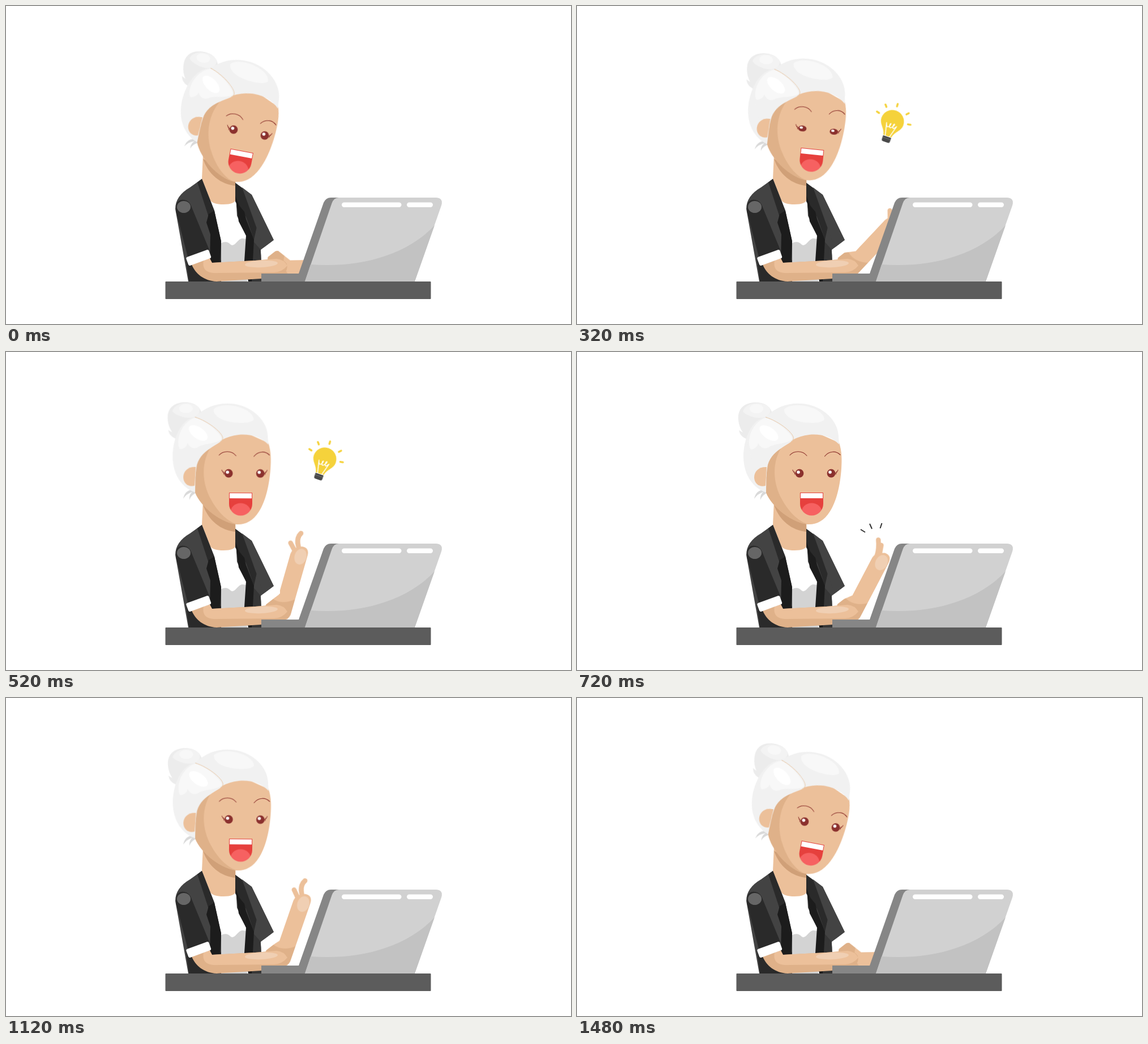
These frames come from a looping animation (998x561 px, 1.76 s). An HTML page:

```html
<!DOCTYPE html>
<html lang="en">
<head>
<meta charset="utf-8">
<title>Bright idea</title>
<style>
  html, body { margin: 0; width: 100%; height: 100%; overflow: hidden; background: #fff; }
  svg { display: block; width: 100%; height: 100%; }

  .head, .brows, .eyes, .arm, .bulb, .glow, .open, .closed, .spark {
    animation: 1760ms cubic-bezier(.4, .1, .6, .9) infinite;
  }
  .head { transform-origin: 376px 264px; animation-name: nod; }
  .brows { animation-name: raise; }
  .eyes { transform-origin: 0 214px; animation-name: blink; animation-timing-function: linear; }
  .arm { animation-name: swing; }
  .bulb { animation-name: rise; animation-timing-function: linear; }
  .glow { animation-name: glow; animation-timing-function: linear; }
  .open { animation-name: part; animation-timing-function: step-end; }
  .closed { animation-name: snap; animation-timing-function: step-end; }
  .spark { animation-name: spark; animation-timing-function: step-end; }

  @keyframes nod {
    0%, 6.82%, 84.09%, 100% { transform: rotate(10.7deg); }
    31.25%, 61.36% { transform: rotate(0deg); }
  }
  @keyframes raise {
    0%, 2.27%, 84.09%, 100% { transform: translateY(10.7px); }
    18.18%, 61.36% { transform: translateY(0); }
  }
  @keyframes blink {
    0%, 11.36%, 19.32%, 100% { transform: scaleY(1); }
    15.91% { transform: scaleY(.1); }
  }
  @keyframes swing {
    0%, 2.27%, 84.09%, 100% { transform: translate(478px, 452px) rotate(-1deg); }
    29.55%, 34.09%, 53.41%, 61.36% { transform: translate(478px, 452px) rotate(-74deg); }
    42.05% { transform: translate(478px, 452px) rotate(-61.5deg); }
  }
  @keyframes rise {
    0%, 11.36% { transform: translate(553.4px, 213px) rotate(19deg); }
    36.36%, 100% { transform: translate(566.6px, 180px) rotate(19deg); }
  }
  @keyframes glow {
    0%, 11.36% { opacity: 0; }
    15.91%, 36.3% { opacity: 1; }
    36.35%, 100% { opacity: 0; }
  }
  @keyframes part {
    0%, 45.45% { opacity: 1; }
    37.5% { opacity: 0; }
  }
  @keyframes snap {
    0%, 45.45% { opacity: 0; }
    37.5% { opacity: 1; }
  }
  @keyframes spark {
    0%, 45.45% { opacity: 0; }
    38.64% { opacity: 1; }
  }

  .skin { fill: #ecc09a; }
  .shade { fill: #dfb189; }
  .shine { fill: #f0cfb3; }
  .finger { fill: none; stroke: #ecc09a; stroke-width: 8.5; stroke-linecap: round; }
  .coal { fill: #1c1c1c; }
  .dark { fill: #2a2a2a; }
  .gray { fill: #434343; }
  .white { fill: #fff; }
  .hair { fill: #f1f1f1; }
  .gloss { fill: #f8f8f8; }
  .brow { fill: none; stroke: #8c322c; stroke-width: 1.1; stroke-linecap: round; }
  .iris { fill: #8b312e; }
  .yellow { fill: #f5d23b; }
  .ray { stroke: #f5d23b; stroke-width: 3.4; stroke-linecap: round; }
</style>
</head>
<body>
<svg viewBox="0 0 998 561">
  <defs>
    <clipPath id="mouth"><path d="M394 248H435V268A20.5 20.5 0 0 1 394 268Z"/></clipPath>
    <path id="ray" class="ray" d="M28 0H32.5"/>
  </defs>

  <!-- bulb -->
  <g class="bulb"><g class="glow">
    <path class="yellow" d="M-20.5 0A20.5 20.5 0 1 1 20.5 0C20.5 11 9 16 7.5 27H-7.5C-9 16 -20.5 11 -20.5 0Z"/>
    <path d="M-4 27L-9 5Q-7 13 -4 11T-1 4Q-3 4 -2 9T3 9T5 3Q3 4 4 9T10 6L4 27" fill="none" stroke="#fff" stroke-width="1.5" stroke-linejoin="round"/>
    <path d="M-7.5 28H7.5V35Q7.5 38 4.5 38H-4.5Q-7.5 38 -7.5 35Z" fill="#4a4a4a"/>
    <path d="M-7.5 31.5H7.5" stroke="#777" stroke-width=".8"/>
    <use href="#ray" transform="rotate(-166)"/>
    <use href="#ray" transform="rotate(-131)"/>
    <use href="#ray" transform="rotate(-92)"/>
    <use href="#ray" transform="rotate(-46)"/>
    <use href="#ray" transform="rotate(-9)"/>
  </g></g>

  <!-- far arm -->
  <path class="spark" d="M501 313L509 318M517 303L521 312M538.5 302L535.5 311" stroke="#333" stroke-width="2"/>
  <g class="arm">
    <g class="open">
      <path class="finger" d="M105 4L117.500 -8M111 10Q127 -2 139 5"/>
    </g>
    <g class="closed">
      <path class="finger" d="M106 3Q120 0 132 -8M110 6L126 1"/>
    </g>
    <path class="skin" d="M-15 -11Q-6 -20 3 -20L24 -3H99Q108 -2 112 4L117 13Q119 27 103 27H0Q-18 27 -18 10Z"/>
    <path class="shade" d="M-15 -11Q-6 -20 3 -20L14 -11Q8 8 24 27H0Q-18 27 -18 10Z"/>
    <ellipse class="shine" cx="99" cy="15.5" rx="14" ry="10.5"/>
  </g>

  <!-- neck and shirt -->
  <path class="white" d="M350 335H408L426 400V486H378L364 380Z"/>
  <path d="M378 420C386 414 392 416 397 421C404 426 409 411 417 410L426 411V486H378Z" fill="#d3d3d3"/>
  <path class="skin" d="M348 262L346 305L361 343Q366 350 384 350Q404 350 406 341L405 280Z"/>
  <path d="M348 270C358 298 380 315 405 317V290Z" fill="#d0a078"/>

  <!-- jacket -->
  <path class="gray" d="M346 305L325 320Q299 335 299 358L322 486H380V415L368 361Z"/>
  <path class="dark" d="M338 311L346 305L368 361L358 372Z"/>
  <path class="dark" d="M301 349Q305 340 315 342Q325 344 328 355L359 430L321 442L300 362Z"/>
  <path class="dark" d="M318 446L323 486H380V448Z"/>
  <path class="coal" d="M358 367L368 361L380 415L378 455H360L361 403L354 382Z"/>
  <ellipse cx="314" cy="354.5" rx="12" ry="10.5" fill="#666"/>
  <path class="gray" d="M405 312L434 333L473 413L450 430L452 486H428L424 405L408 370Z"/>
  <path d="M434 412L450 430L452 486H428Z" fill="#363636"/>
  <path class="dark" d="M405 312L417 321L447 372L438 412L424 372L405 345Z"/>
  <path class="gray" d="M417 320L434 333L473 413L455 426Z"/>
  <path class="coal" d="M405 335L412 352L421 363L424 376L438 412L434 486H428L421 450L424 405L411 380Z"/>
  <path class="white" d="M450 431L473 413L484 420V426L456 448H452Z"/>

  <!-- near arm -->
  <path class="shade" d="M328 456C334 472 350 485 372 486L450 481L490 471Q499 466 496 455Q492 447 478 446L440 449L364 453L358 446Z"/>
  <path class="skin" d="M349 449C346 464 354 471 370 471L474 470Q488 469 497 458Q491 447 478 446L440 449L364 453L360 445Z"/>
  <ellipse class="shine" cx="451" cy="455" rx="29" ry="6" transform="rotate(-3 451 455)"/>
  <rect class="white" x="319" y="436" width="42.500" height="16" rx="3" transform="rotate(-20 340.500 444)"/>

  <!-- head -->
  <g class="head">
    <path d="M285 120C283 97 299 89 316 89C334 89 345 99 345 112L325 140L302 154Q288 150 286 138L293 142Q286 132 285 120Z" fill="#ececec"/>
    <path d="M293 105C298 88 327 86 340 98C347 116 323 119 309 114Q298 111 293 105Z" fill="#f3f3f3"/>
    <ellipse cx="317" cy="100" rx="12" ry="8" class="gloss"/>
    <path d="M334 243Q316 242 313 259Q319 250 329 247Q323 252 324 261Q327 252 337 248Z" fill="#d9d9d9"/>
    <path class="hair" d="M333 115C309 119 294 151 294 186C295 219 312 240 334 248L352 210L382 156Z"/>
    <path class="skin" d="M334 248L335 207C337 184 352 168 380 154L418 140L463 160C468 175 468 190 467 205C465 236 458 264 447 281C436 299 421 305 408 304C382 302 344 274 334 248Z"/>
    <path class="shade" d="M334 248L335 207C337 186 347 174 364 164C343 193 346 232 362 260C375 284 394 301 410 304C382 303 344 274 334 248Z"/>
    <path class="hair" d="M334 115C354 93 383 87 410 93C442 101 462 126 462 150L463 163C449 149 430 144 410 146Q394 148 381 155Q379 134 334 115Z"/>
    <path class="gloss" d="M366 101C382 86 435 97 437 119C431 130 365 127 366 101Z"/>
    <path class="hair" d="M333 115C358 123 386 146 382 154C378 164 340 172 336 205L332 237L316 210L300 160Z"/>
    <path class="skin" d="M335 203C322 202 313 210 313 221C313 232 322 239 333 236Z"/>
    <path class="gloss" d="M333 116C357 123 382 147 380 154C370 163 347 161 339 168Q327 174 320 161Q319 170 307 172C299 160 306 126 333 116Z"/>
    <ellipse class="white" cx="339" cy="143" rx="19" ry="10" transform="rotate(35 339 143)"/>
    <path d="M333 115C357 122 386 145 382 154Q381 157 378 158" fill="none" stroke="#e9c9a9" stroke-width="1"/>

    <g class="brows">
      <path class="brow" d="M376 182C383 174 398 173 406 183M437.500 184C445 174 458 174 465 181.500"/>
    </g>
    <path class="brow" d="M381 208Q382 213 387 214M383.500 211L385 216M461 208Q460 213 455 214M458.500 211L457 216"/>
    <g class="eyes">
      <circle class="iris" cx="393" cy="214" r="7.400"/>
      <circle class="iris" cx="449" cy="214" r="7.400"/>
      <circle class="white" cx="391" cy="212" r="2.800"/>
      <circle class="white" cx="447" cy="212" r="2.800"/>
    </g>

    <g clip-path="url(#mouth)">
      <path d="M394 248H435V290H394Z" fill="#e6403d"/>
      <ellipse cx="414.500" cy="283" rx="18" ry="16.500" fill="#f66161"/>
      <path class="white" d="M395 249H434V258H395Z"/>
    </g>
  </g>

  <!-- laptop and desk -->
  <path d="M451 472H517L561 347Q565 338 574 338H600L540 486H451Z" fill="#868686"/>
  <path d="M528 486L575.500 348Q579 338 588 338H760Q773 339 769 352L722 486Z" fill="#d1d1d1"/>
  <path d="M538 456C616 462 704 444 757 387L722 486H528Z" fill="#c2c2c2"/>
  <rect class="white" x="593" y="346.500" width="105.500" height="8.500" rx="4.200"/>
  <rect class="white" x="708" y="346.500" width="46" height="8.500" rx="4.200"/>
  <rect x="281.500" y="486" width="469" height="31" rx="1" fill="#5c5c5c"/>
</svg>
</body>
</html>
```
